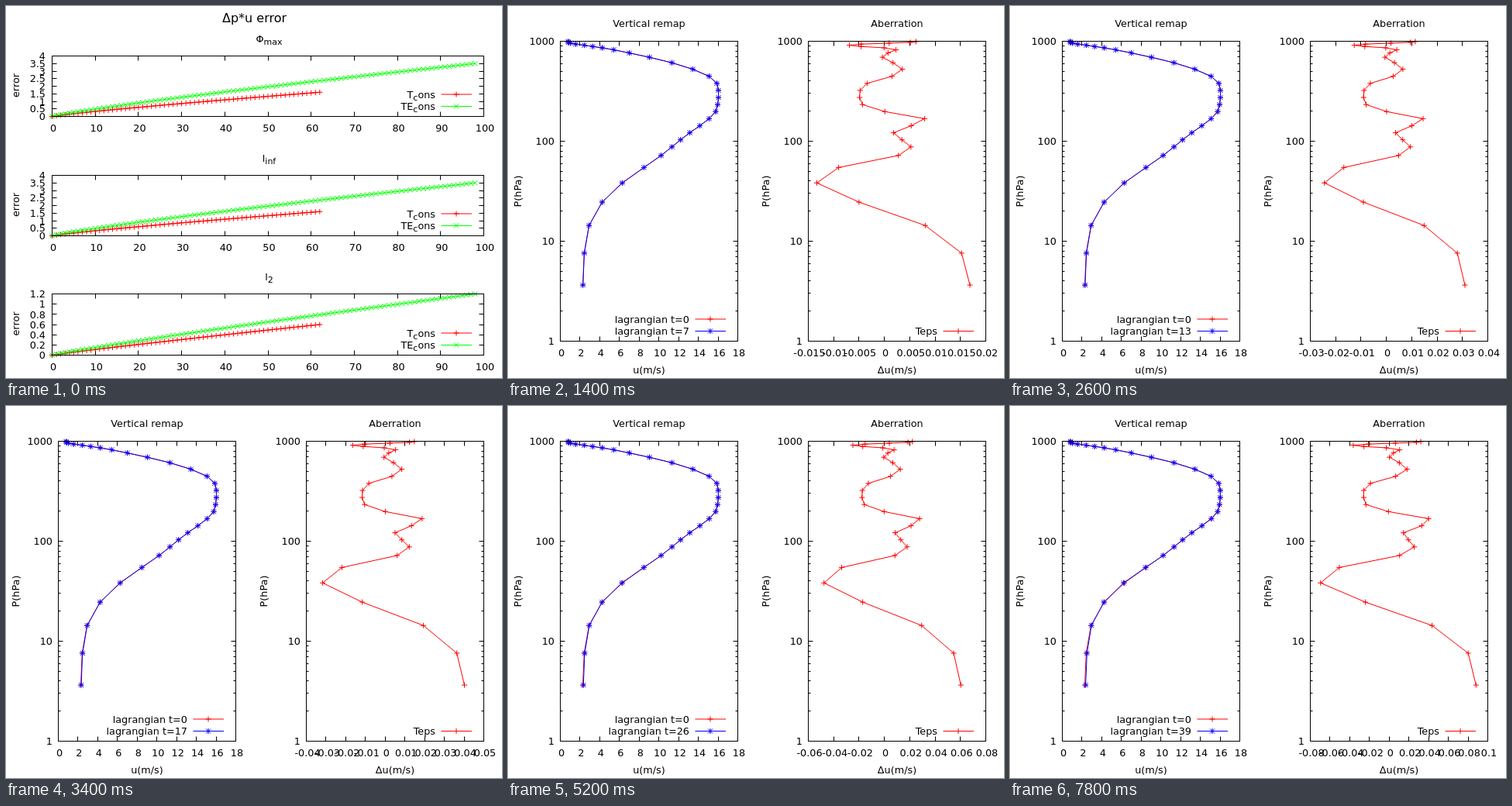
Animation of 640x480 px, one loop 8000 ms. Source, as an HTML page:

```html
<!DOCTYPE html>
<html lang="en">
<head>
<meta charset="utf-8">
<title>Vertical remap</title>
<style>
  html, body { margin: 0; width: 100%; height: 100%; overflow: hidden; background: #fff; }
  svg { display: block; width: 640px; height: 480px; font: 12.8px "DejaVu Sans", sans-serif; }
  path { fill: none; stroke-width: 1; }
</style>
</head>
<body>
<svg id="stage" viewBox="0 0 640 480"></svg>
<script>
const RED = '#f00', GREEN = '#0f0', BLUE = '#00f';
const STEP_MS = 200, STEPS = 40;

// Pressure levels (hPa) and the initial wind (m/s) at each.
const pressure = [3.64, 7.59, 14.36, 24.6, 38.3, 54.6, 72, 87.8, 103.3, 121.5,
  142.9, 168.2, 197.9, 232.8, 273.9, 322.2, 379.1, 446, 524.7, 609.8,
  691.4, 763.4, 820.9, 859.5, 887, 912.6, 936.2, 957.5, 976.3, 992.6];
const wind = [2.28, 2.42, 2.91, 4.25, 6.29, 8.49, 10.22, 11.32, 12.19, 13.13,
  14.15, 15.09, 15.76, 15.96, 16.04, 16.04, 15.88, 15.09, 13.44, 11.32,
  9.04, 7, 5.42, 4.25, 3.3, 2.44, 1.57, 1.02, 0.83, 0.78];

// Mean drift per step (1e-5 m/s), early and late in the run.
const T_EARLY = 13.67, T_LATE = 32.67;
const early = [237.9, 215, 114.4, -69.5, -187.8, -129.1, 36.9, 72.8, 49.6, 28.1,
  77.5, 111.2, 0.7, -61.4, -69.1, -67.8, -48.6, 20.5, 49.8, 24.7,
  -4.3, 10.6, 31.5, -2.1, -65.6, -97.4, -62.9, 14, 72.7, 87.5];
const late = [228.8, 207.8, 112.2, -63.8, -180.8, -129.7, 29.6, 67.2, 49.9, 34.8,
  82.8, 104.8, -1.3, -60.6, -67.1, -66.4, -48.6, 17.8, 47.3, 26,
  -0.5, 11, 28.2, -6.1, -65.7, -94.5, -56.2, 15.7, 71.3, 83.5];

const drift = t => early.map((a, i) =>
  t * (a + (late[i] - a) * (t - T_EARLY) / (T_LATE - T_EARLY)) * 1e-5);

const path = (d, color = '#000') => `<path d="${d}" stroke="${color}"/>`;
const text = (x, y, s, anchor = 'middle', extra = '') =>
  `<text x="${x}" y="${y}" text-anchor="${anchor}" ${extra}>${s}</text>`;
const upright = (x, y, s) => text(x, y, s, 'middle', `transform="rotate(-90 ${x} ${y})"`);
const sub = (base, low, rest = '') =>
  `${base}<tspan dy="3" font-size="11">${low}</tspan>` + (rest && `<tspan dy="-3">${rest}</tspan>`);

const PLUS = 'm-3.5 0h7m-3.5 -3.5v7';
const CROSS = 'm-3 -3l6 6m0 -6l-6 6';
const STAR = CROSS + 'm3 -6.5v7m-3.5 -3.5h7'.replace('-6.5v7', '-6.5v7');

const at = ([x, y]) => `${x.toFixed(2)} ${y.toFixed(2)}`;
const curve = (points, mark, color) =>
  path('M' + points.map(at).join('L') + points.map(p => 'M' + at(p) + mark).join(''), color);
const legend = (xEnd, y, label, mark, color) =>
  text(xEnd - 47, y + 4.5, label, 'end') +
  curve([[xEnd - 39.5, y], [xEnd, y]], '', color) + path(`M${xEnd - 20} ${y}${mark}`, color);

// Tick step for an automatic axis with room for about twenty positions.
function tickStep(span) {
  const power = 10 ** Math.floor(Math.log10(span)), room = 20 * power / span;
  return power * (room > 10 ? 0.2 : room > 4 ? 0.5 : room > 2 ? 1 : 2);
}

const crisp = v => Math.floor(v) + 0.5;
const xTick = (b, x, n) => `M${crisp(x)} ${b.y1}v${-n}M${crisp(x)} ${b.y0}v${n}`;
const yTick = (b, y, n) => `M${b.x0} ${crisp(y)}h${n}M${b.x1} ${crisp(y)}h${-n}`;
const frame = b => `M${b.x0} ${b.y0}H${b.x1}V${b.y1}H${b.x0}Z`;

function linearX(b, lo, hi, step) {
  const map = v => b.x0 + (v - lo) / (hi - lo) * (b.x1 - b.x0);
  let marks = '', labels = '';
  for (let i = Math.round(lo / step); i <= Math.round(hi / step); i++) {
    marks += xTick(b, map(i * step), 6);
    labels += text(map(i * step) + 1.5, b.y1 + 19.7, +(i * step).toFixed(6));
  }
  return { map, svg: path(marks) + labels };
}

function linearY(b, hi, step) {
  const map = v => b.y1 - v / hi * (b.y1 - b.y0);
  let marks = '', labels = '';
  for (let i = 0; i <= Math.round(hi / step); i++) {
    marks += yTick(b, map(i * step), 6);
    labels += text(b.x0 - 8.5, map(i * step) + 4.7, +(i * step).toFixed(6), 'end');
  }
  return { map, svg: path(marks) + labels };
}

function logY(b) {
  const map = v => b.y1 - Math.log10(v) / 3 * (b.y1 - b.y0);
  let marks = '', labels = '';
  for (const decade of [1, 10, 100, 1000]) {
    marks += yTick(b, map(decade), 6);
    labels += text(b.x0 - 7.5, map(decade) + 4.7, decade, 'end');
    for (let m = 2; m < 10 && decade < 1000; m++) marks += yTick(b, map(m * decade), 3);
  }
  return { map, svg: path(marks) + labels };
}

function errorPanel(y0, y1, title, top, step, red, green) {
  const b = { x0: 59.5, x1: 616.5, y0, y1 };
  const x = linearX(b, 0, 100, 10), y = linearY(b, top, step);
  const growth = (last, [end, power]) => Array.from({ length: last + 1 },
    (_, i) => [x.map(i), y.map(end * (i / last) ** power)]);
  return x.svg + y.svg + text(339.5, y0 - 17.5, title) + upright(16.5, (y0 + y1) / 2 - 1, 'error') +
    legend(601, y1 - 28.5, sub('T', 'c', 'ons'), PLUS, RED) +
    legend(601, y1 - 13, sub('TE', 'c', 'ons'), CROSS, GREEN) +
    curve(growth(62, red), PLUS, RED) + curve(growth(98, green), CROSS, GREEN) + path(frame(b));
}

function errorScene() {
  const red = [1.6, 0.865], green = [3.5, 0.86];
  return text(320.5, 21, 'Δp*u error', 'middle', 'font-size="16"') +
    errorPanel(64.5, 142.5, sub('Φ', 'max'), 4, 0.5, red, green) +
    errorPanel(218.5, 296.5, sub('l', 'inf'), 4, 0.5, red, green) +
    errorPanel(371.5, 450.5, sub('l', '2'), 1.2, 0.2, [0.6, 0.93], [1.2, 0.91]);
}

function profilePlot(b, x, title, xName, series) {
  const y = logY(b), mid = (b.x0 + b.x1) / 2;
  const curves = series.map(({ values, mark, color }) =>
    curve(values.map((v, i) => [x.map(v), y.map(pressure[i])]), mark, color)).join('');
  const keys = series.map(({ label, mark, color }, i) =>
    legend(b.x1 - 15.5, 419.5 - 15.5 * (series.length - 1 - i), label, mark, color)).join('');
  return x.svg + y.svg + text(mid, 27, title) + text(mid, 474, xName) +
    upright(b.x0 - 51, 239, 'P(hPa)') + keys + curves + path(frame(b));
}

function remapScene(t) {
  const left = { x0: 67.5, x1: 296.5, y0: 45.5, y1: 432.5 };
  const right = { ...left, x0: 387.5, x1: 616.5 };
  const change = drift(t), lo = Math.min(...change), hi = Math.max(...change);
  const step = tickStep(hi - lo);
  const errorAxis = linearX(right, Math.floor(lo / step) * step, Math.ceil(hi / step) * step, step);
  return profilePlot(left, linearX(left, 0, 18, 2), 'Vertical remap', 'u(m/s)', [
    { values: wind, label: 'lagrangian t=0', mark: PLUS, color: RED },
    { values: wind.map((u, i) => u + change[i]), label: 'lagrangian t=' + t, mark: STAR, color: BLUE },
  ]) + profilePlot(right, errorAxis, 'Aberration', 'Δu(m/s)', [
    { values: change, label: 'Teps', mark: PLUS, color: RED },
  ]);
}

const stage = document.getElementById('stage');
let shown = -1;
function draw() {
  const t = Math.floor(performance.now() / STEP_MS) % STEPS;
  if (t !== shown) {
    stage.innerHTML = t ? remapScene(t) : errorScene();
    shown = t;
  }
  requestAnimationFrame(draw);
}
draw();
</script>
</body>
</html>
```
